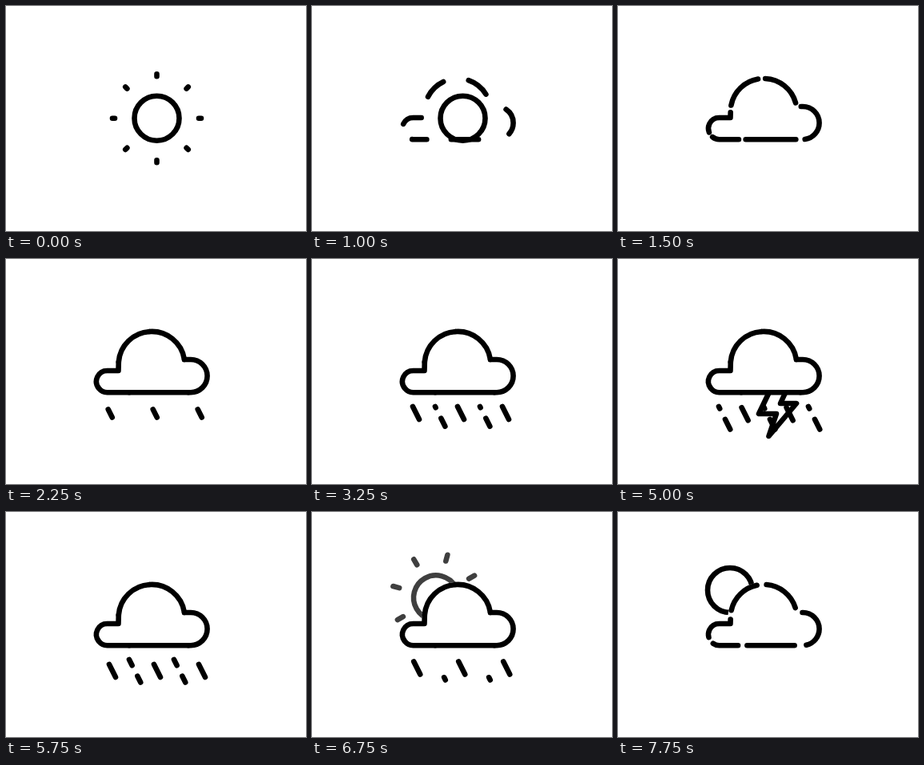
Write an HTML page that moves like this. It is 375 by 282 pixels and loops after 8000 ms.

```html
<!DOCTYPE html>
<html lang="en">
<head>
<meta charset="utf-8">
<title>Weather icon</title>
<style>
  html, body { margin: 0; width: 100%; height: 100%; overflow: hidden; background: #fff; }
  svg { display: block; width: 100%; height: 100%; }
  path, circle { fill: none; stroke: #000; stroke-width: 6.6; stroke-linecap: round; stroke-linejoin: round; }
  #mask { fill: #fff; stroke: #fff; }
</style>
</head>
<body>
<svg viewBox="0 0 375 282">
  <g id="sun"><circle r="28"/><path id="rays"/></g>
  <path id="mask"/>
  <path id="rain"/>
  <path id="bolt" pathLength="1" d="M188 169L176 194H198L188.5 222L223 181H203L208.5 169"/>
  <g id="cloud"></g>
</svg>
<script>
const LOOP = 8, STEP = 0.25;
const $ = id => document.getElementById(id);
const clamp = (v, lo = 0, hi = 1) => Math.min(hi, Math.max(lo, v));
const progress = (t, from, to) => clamp((t - from) / (to - from));
const show = (el, on) => el.style.display = on ? '' : 'none';

// Cloud outline, clockwise: start point and path of each stroke.
const strokes = [
  ['116 162', 'A13.5 13.5 0 0 1 126.5 140H140.5L140.8 129'],
  ['140.8 129', 'A41.2 41.2 0 0 1 179.5 91'],
  ['179.5 91', 'A41.2 41.2 0 0 1 223 126'],
  ['223 126', 'L231 126A20.6 20.6 0 0 1 231 167.2H228'],
  ['228 167.2', 'H154'],
  ['154 167.2', 'H126.5A13.5 13.5 0 0 1 116 162']
];
$('mask').setAttribute('d', 'M116 162' + strokes.map(s => s[1]).join('') + 'Z');
for (const [start, d] of strokes) {
  const path = document.createElementNS('http://www.w3.org/2000/svg', 'path');
  path.setAttribute('d', `M${start}${d}`);
  path.setAttribute('pathLength', 1);
  $('cloud').append(path);
}

// Show only the part of a path between two fractions of its length.
function trim(path, from, to) {
  show(path, to > from);
  const whole = from <= 0 && to >= 1;
  path.setAttribute('stroke-dasharray', whole ? 'none' : `${to - from} 2`);
  path.setAttribute('stroke-dashoffset', -from);
}

function drawSun(t) {
  const leaving = t < 4;
  const rest = (1 - progress(t, 6.25, 7.54)) ** 2;
  const [x, y, angle] = leaving ? [188.5, 140.7, 0] : [140 + 40 * rest, 98 + 25 * rest, 40 * rest];
  const opacity = leaving ? 1 - progress(t, 1, 1.5) : progress(t, 6.25, 6.917);
  const length = leaving ? 3 - 20 * t : 8 * (1 - progress(t, 7.25, 7.65));
  $('sun').setAttribute('transform', `translate(${x} ${y}) rotate(${angle})`);
  $('sun').setAttribute('opacity', opacity);
  let d = '';
  for (let i = 0; i < 8 && length > 0; i++) {
    const c = Math.cos(i * Math.PI / 4), s = Math.sin(i * Math.PI / 4), inner = 55.5 - length;
    d += `M${inner * c} ${inner * s}L${55.5 * c} ${55.5 * s}`;
  }
  $('rays').setAttribute('d', d);
}

// Drops slide down five slanted tracks; every other track runs half a period late.
function drawRain(t) {
  const period = 29.5;
  let d = '';
  for (let track = 0; track < 5; track++) {
    const late = track % 2, last = late ? 3 : 4;
    for (let n = 0; n <= last; n++) {
      let tail = 3.5 + 26 * (t - 2.25) - period * (n + late / 2);
      const head = Math.min(tail + (n ? 16 : 10), n === last ? 25.5 : 28.5);
      if (n === last) tail += 0.7 * Math.max(0, tail - 10);
      tail = Math.max(0, tail);
      if (head <= tail) continue;
      const point = s => `${126 + 28 * track + s / 2} ${185 + s}`;
      d += `M${point(tail)}L${point(head)}`;
    }
  }
  $('rain').setAttribute('d', d);
}

function draw(t) {
  const grown = t < 4 ? progress(t, 0.4, 1.7) : 1 - progress(t, 7.5, 8.75);
  for (const path of $('cloud').children) trim(path, (1 - grown) / 2, (1 + grown) / 2);
  show($('mask'), t > 1.5);
  trim($('bolt'), progress(t, 5.1, 5.75), progress(t, 4, 4.6));
  drawSun(t);
  drawRain(t);
}

function tick(now) {
  let t = Math.floor(now / 1000 % LOOP / STEP) * STEP;
  if (t === 2) t = 1.75; // brief pause before the rain sets in
  draw(t);
  requestAnimationFrame(tick);
}
draw(0);
requestAnimationFrame(tick);
</script>
</body>
</html>
```
